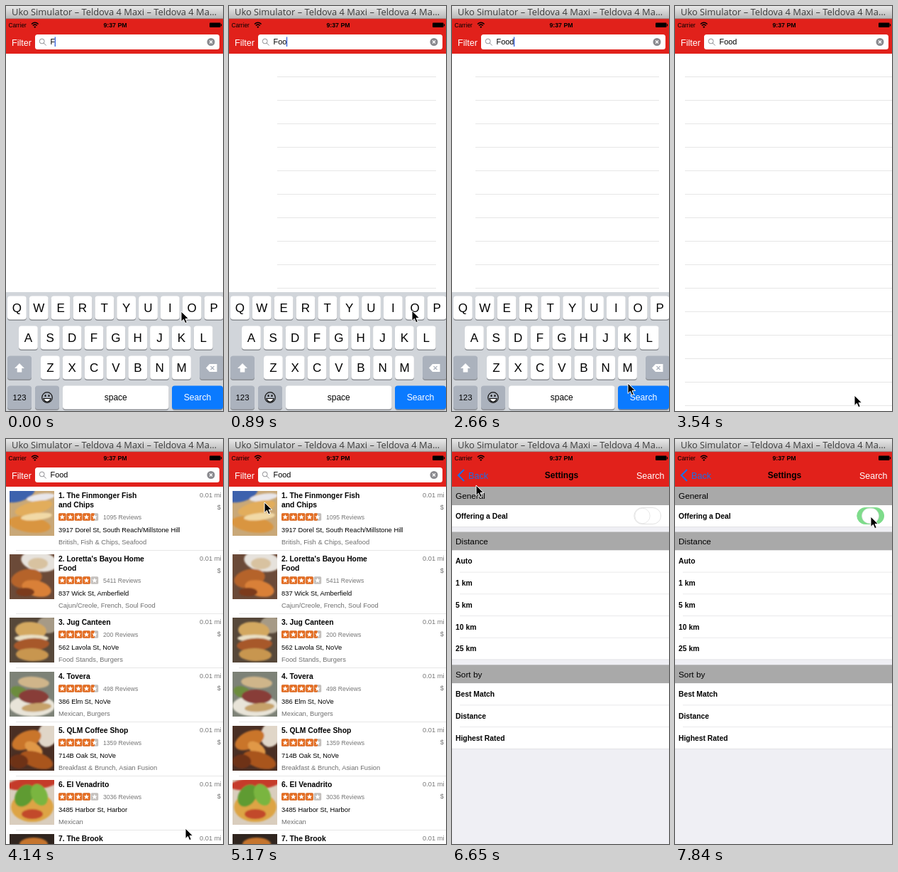
An HTML page that plays this animation: 306x569 px, repeating every 7.99 s.

```html
<!DOCTYPE html>
<html lang="en">
<head>
<meta charset="utf-8">
<title>Search and filter</title>
<style>
  html, body { margin: 0; width: 100%; height: 100%; overflow: hidden; background: #fff; }
  svg { display: block; width: 306px; height: 569px; }
  text { font-family: "Liberation Sans", Arial, sans-serif; white-space: pre; }
  .bold { font-weight: 700; }
  .window { font-family: "Open Sans", "Noto Sans", sans-serif; }
</style>
</head>
<body>
<svg id="stage" viewBox="0 0 306 569">
  <defs>
    <linearGradient id="chrome" x2="0" y2="1">
      <stop stop-color="#e9e9e9"/><stop offset="1" stop-color="#b6b6b6"/>
    </linearGradient>
    <clipPath id="frame"><rect width="63" height="63"/></clipPath>
    <filter id="soft"><feGaussianBlur stdDeviation="1"/></filter>
    <path id="star" fill="#fff" d="M0-3.9 1.1-1.3 3.8-1.2 1.7.5 2.4 3.2 0 1.7-2.4 3.2-1.7.5-3.8-1.2-1.1-1.3Z"/>
  </defs>
  <rect width="306" height="569" fill="#fff"/>
  <g id="lines" fill="#e6e6e6"></g>
  <g id="list"></g>
  <rect id="dim" y="67" width="306" height="502"/>
  <g id="keyboard"></g>
  <g id="settings"></g>
  <rect y="18" width="306" height="49" fill="#e1211b"/>
  <g id="status"></g>
  <g id="bar"></g>
  <g id="back" fill="none" stroke="#1a6fe8" stroke-width="2.2"><path d="M17 43 9 51l8 8"/></g>
  <g id="heading"></g>
  <g id="search"></g>
  <g id="window"></g>
  <path id="mouse" d="M0 0v14.5l3.4-3.2 2.3 5.4 2.6-1.1-2.3-5.2h4.6Z" stroke="#fff"/>
</svg>
<script>
(() => {
const LOOP = 7990, STEP = 147.9;
const $ = id => document.getElementById(id);
const add = (id, markup) => $(id).insertAdjacentHTML("beforeend", markup);

const text = (x, mid, str, size, fill = "#000", extra = "") =>
  `<text x="${x}" y="${mid + size * .36}" font-size="${size}" fill="${fill}" ${extra}>${str}</text>`;
const rect = (x, y, w, h, fill, extra = "") =>
  `<rect x="${x}" y="${y}" width="${w}" height="${h}" fill="${fill}" ${extra}/>`;
const BOLD = ' class="bold"', MID = ' text-anchor="middle"', END = ' text-anchor="end"';

// Window chrome, status bar and navigation bar
add("window", rect(0, 0, 306, 18, "url(#chrome)") + rect(0, 17.5, 306, .7, "#8c6a68") +
  text(8, 8.3, "Uko Simulator – Teldova 4 Maxi – Teldova 4 Ma…", 12.9, "#3c3c3c", 'class="window"'));
add("status", text(3.5, 27, "Carrier", 8.3) + text(154, 27, "9:37 PM", 8.8, "#000", MID + BOLD) +
  `<g fill="none" stroke="#000" stroke-width="1.5"><path d="M36 25.5q4.8-4.4 9.6 0M37.8 27.5q3-2.7 6 0"/></g>
   <path d="M39.2 29.2q1.6-1.4 3.2 0l-1.6 1.7Z"/>` +
  rect(287, 23.5, 15.5, 6.5, "#000", 'rx="1"') + rect(303, 25.3, 1.2, 3, "#000"));
add("bar", `<g id="filter">${text(8, 51, "Filter", 12.6, "#fff")}</g><g id="field">` +
  rect(41, 40, 260, 21, "#fff", 'rx="3.5"') +
  `<g fill="none" stroke="#8e8e93"><circle cx="50.7" cy="49.5" r="3.4"/><path d="m53.2 52 3.5 3.5"/></g>
   <circle cx="289" cy="50.5" r="5.5" fill="#8a8a8f"/>
   <path d="m287 48.5 4 4m0-4-4 4" stroke="#fff" stroke-width="1.2"/>` +
  text(62.5, 50.5, "", 10.9, "#000", 'id="query"') +
  rect(0, 43.5, 1.4, 13.5, "#3b66e0", 'id="caret"') + "</g>");
add("back", text(23, 51, "Back", 12.6, "#1a6fe8", 'stroke="none"'));
add("heading", text(154.5, 51, "Settings", 12, "#000", MID + BOLD));
add("search", text(299.5, 51, "Search", 12.5, "#fff", END));

for (let y = 99; y < 569; y += 33) add("lines", `<rect y="${y}" height="1"/>`);

// Photos: background, then "fill x y rx ry turn" blobs
const photos = [
  ["#c9a878", "#3e62ad 12 4 24 11 -15", "#e8e6ea 44 9 20 5 -8", "#e2ad5c 34 24 27 9 -14", "#d9953f 28 47 30 11 8", "#f1d9a6 38 36 22 5 -6"],
  ["#6b4a38", "#e6e2dc 42 10 26 14 10", "#d8c2a0 40 13 14 8 0", "#b5642c 24 34 22 13 -12", "#d98038 38 48 21 11 14", "#7b3a1c 22 53 13 6 0"],
  ["#57483a", "#a69a86 54 10 15 12 0", "#d3a861 30 18 22 12 4", "#e9dfc4 31 29 24 5 0", "#a7582a 31 38 25 9 -4", "#c8964f 32 52 23 9 2"],
  ["#7d8277", "#e8e4d8 32 48 32 15 0", "#cfb58a 34 15 22 8 4", "#6c8c3d 14 29 13 8 20", "#883d38 34 35 21 10 3", "#c6a26b 38 50 21 6 -5"],
  ["#4a2f24", "#e0d6c8 54 12 14 18 15", "#c9752c 24 20 22 12 -25", "#e09846 34 32 14 8 35", "#a9551f 38 48 24 11 18", "#6e3018 13 50 13 10 0"],
  ["#d9cdbd", "#c53a2b 32 5 36 9 -6", "#dda445 32 38 30 21 0", "#5f9b32 21 22 12 17 35", "#7ab540 42 21 11 16 -25", "#c24a2c 32 48 15 7 0"],
  ["#30251f", "#c5752f 34 14 20 9 0"]
];
const blob = b => {
  const [fill, x, y, rx, ry, turn] = b.split(" ");
  return `<ellipse rx="${rx}" ry="${ry}" fill="${fill}" transform="translate(${x} ${y}) rotate(${turn})"/>`;
};
const photo = ([ground, ...blobs]) =>
  rect(0, 0, 63, 63, ground) + `<g filter="url(#soft)">${blobs.map(blob).join("")}</g>`;

const stars = (mid, rating) => [0, 1, 2, 3, 4].map(i => {
  const x = 74 + i * 11.4, part = Math.max(0, Math.min(1, rating - i));
  return rect(x, mid - 5.3, 10.6, 10.6, "#c4c0bd", 'rx="1.5"') +
    rect(x, mid - 5.3, 10.6 * part, 10.6, "#e46d22", 'rx="1.5"') +
    `<use href="#star" x="${x + 5.3}" y="${mid + .2}"/>`;
}).join("");

const places = [
  ["The Finmonger Fish|and Chips", 4.5, 1095, "3917 Dorel St, South Reach/Millstone Hill", "British, Fish &amp; Chips, Seafood"],
  ["Loretta's Bayou Home|Food", 4, 5411, "837 Wick St, Amberfield", "Cajun/Creole, French, Soul Food"],
  ["Jug Canteen", 4.5, 200, "562 Lavola St, NoVe", "Food Stands, Burgers"],
  ["Tovera", 4.5, 498, "386 Elm St, NoVe", "Mexican, Burgers"],
  ["QLM Coffee Shop", 4.5, 1359, "714B Oak St, NoVe", "Breakfast &amp; Brunch, Asian Fusion"],
  ["El Venadrito", 4, 3036, "3485 Harbor St, Harbor", "Mexican"],
  ["The Brook", 4, 812, "", ""]
];
let rowTop = 67;
add("list", rect(0, 67, 400, 502, "#fff"));
places.forEach(([name, rating, reviews, street, kinds], i) => {
  const titles = `${i + 1}. ${name}`.split("|"), y = rowTop + (titles.length - 1) * 13;
  add("list",
    `<g class="photo" clip-path="url(#frame)" transform="translate(5 ${rowTop + 6})">${photo(photos[i])}</g>` +
    titles.map((l, n) => text(74, rowTop + 12 + n * 13, l, 10.35, "#000", BOLD)).join("") +
    stars(y + 29.5, rating) +
    text(137, y + 30, reviews + " Reviews", 8.6, "#777") +
    text(74, y + 47.3, street, 9.35) + text(74, y + 64.5, kinds, 9.35, "#6f6f6f") +
    text(303.5, rowTop + 12, "0.01 mi", 9.3, "#777", END) + text(303, rowTop + 29, "$", 9.3, "#777", END) +
    rect(14, y + 76, 292, .8, "#e2e2e2"));
  rowTop = y + 76;
});

// Keyboard
const key = (x, y, w, label = "", size = 17, fill = "#fff", ink = "#000") =>
  rect(x, y + 1, w, 33.5, "#8b8e93", 'rx="4"') + rect(x, y, w, 33, fill, 'rx="4"') +
  text(x + w / 2, y + 16.5, label, size, ink, MID);
const keyRow = (letters, x, y) => [...letters].map((c, i) => key(x + i * 30.85, y, 26.8, c)).join("");
const GREY = "#abb2bd";
add("keyboard", rect(0, 402, 306, 168, "#d1d5da") +
  keyRow("QWERTYUIOP", 2, 407.5) + keyRow("ASDFGHJKL", 18, 449.5) + keyRow("ZXCVBNM", 49, 491.5) +
  key(2, 491.5, 34, "", 11, GREY) + key(273, 491.5, 34, "", 11, GREY) +
  key(2, 533.5, 34, "123", 11.3, GREY) + key(41, 533.5, 34, "", 11, GREY) +
  key(80, 533.5, 149.5, "space", 12) + key(234, 533.5, 72, "Search", 12.2, "#0a7aff", "#fff") +
  `<path d="m19 502 7 7h-3.7v5.5h-6.6V509H12Z" fill="#fff"/>
   <path d="m282 508.5 5-5.5h10.5v11H287Z" fill="#fff"/>
   <path d="m288.500 506 5 5m0-5-5 5" stroke="${GREY}" stroke-width="1.2"/>
   <g fill="none" stroke="#111" stroke-width="1.2"><circle cx="58" cy="550" r="7.3"/>
   <path d="M53 551.5h10q-1 4.5-5 4.5t-5-4.5Z" fill="#fff"/></g>
   <ellipse cx="55.5" cy="547.5" rx="1" ry="1.6"/><ellipse cx="60.5" cy="547.5" rx="1" ry="1.6"/>`);

// Settings page
const PITCH = 30.7;
const section = (y, title, rows) => {
  const body = y + 26;
  add("settings", rect(0, y, 306, 26, "#a9a9a9") + text(5, y + 13, title, 11.8) +
    rect(0, body, 306, rows.length * PITCH, "#fff") +
    rows.map((r, i) => text(5, body + 15.2 + i * PITCH, r, 10.35, "#000", BOLD) +
      (i ? rect(11, body + i * PITCH - .5, 295, .8, "#e4e4e6") : "")).join("") +
    rect(0, body + rows.length * PITCH - .5, 306, .8, "#dcdce0"));
};
add("settings", rect(0, 67, 306, 502, "#efeff4"));
section(67, "General", ["Offering a Deal"]);
section(130.5, "Distance", ["Auto", "1 km", "5 km", "10 km", "25 km"]);
section(317.3, "Sort by", ["Best Match", "Distance", "Highest Rated"]);
add("settings", rect(256.8, 96.5, 37.8, 23, "#fff", 'id="track" rx="11.5" stroke="#e3e3e3"') +
  rect(257.8, 97.3, 21.4, 21.4, "#fff", 'id="knob" rx="10.7" stroke="#d8d8d8" stroke-width=".6"'));

// Pointer way points: step, x, y
const route = [
  [0, 247, 429], [1, 277, 430], [2, 262, 429], [6, 258, 428], [7, 150, 470], [8, 36, 492],
  [11, 123, 472], [13, 95, 466], [16, 93, 466], [18, 248, 530], [21, 253, 547], [29, 253, 547],
  [35, 50, 89], [37, 17, 54], [42, 18, 52], [45, 34, 65], [48, 150, 125], [51, 270, 113], [52, 276, 109], [54, 276, 109]
];
const pointer = s => {
  const i = route.findIndex(p => p[0] > s), [s0, x0, y0] = route[i - 1], [s1, x1, y1] = route[i];
  const k = (s - s0) / (s1 - s0);
  return [x0 + (x1 - x0) * k, y0 + (y1 - y0) * k];
};
const move = (id, x, y = 0) => $(id).setAttribute("transform", `translate(${x} ${y})`);
const show = (id, amount) => { $(id).style.opacity = +amount; };
const set = (node, attrs) => { for (const a in attrs) node.setAttribute(a, attrs[a]); };

// Share of the page push still to go, as a damped spring
const pushLeft = s => {
  const k = Math.max(0, s - 39.4) * 1.32, rest = (1 + k) * Math.exp(-k);
  return rest < .01 ? 0 : rest;
};

function draw(t) {
  const s = Math.min(53, Math.floor((t + 12) / STEP));

  const typed = s < 2 ? 1 : s < 5 ? 2 : s < 15 ? 3 : 4;
  $("query").textContent = "Food".slice(0, typed);
  set($("caret"), { x: 68.6 + (typed - 1) * 6.1 });
  show("caret", s < 20);

  const left = s < 8 ? 68 : s < 20 ? 33 : 14, right = s < 20 ? 292 : 306;
  show("lines", s >= 2 && s < 27);
  for (const line of $("lines").children) set(line, { x: left, width: right - left });

  const k = Math.max(0, Math.min(1, (s - 19.5) / 3));
  move("keyboard", 0, 168 * k * k * (3 - 2 * k));

  show("list", s >= 27);
  for (const p of document.querySelectorAll(".photo")) p.style.opacity = +(s >= 28);

  const rest = pushLeft(s), done = 1 - rest;
  move("list", -92 * done);
  show("dim", .08 * done);
  move("settings", 306 * rest);
  show("settings", done > 0);
  move("field", -17.5 * done);
  show("field", rest);
  show("filter", rest);
  move("back", 139 * rest);
  show("back", done ** 2);
  move("heading", 209 * rest);
  show("heading", done);
  show("search", done);

  const on = s >= 53;
  set($("track"), { fill: on ? "#7edc8b" : "#fff", stroke: on ? "#7edc8b" : "#e3e3e3" });
  set($("knob"), { x: on ? 263.5 : 257.8, width: on ? 24 : 21.4 });

  move("mouse", ...pointer(s));
}

const start = performance.now();
function tick() {
  draw((performance.now() - start) % LOOP);
  requestAnimationFrame(tick);
}
tick();
})();
</script>
</body>
</html>
```
